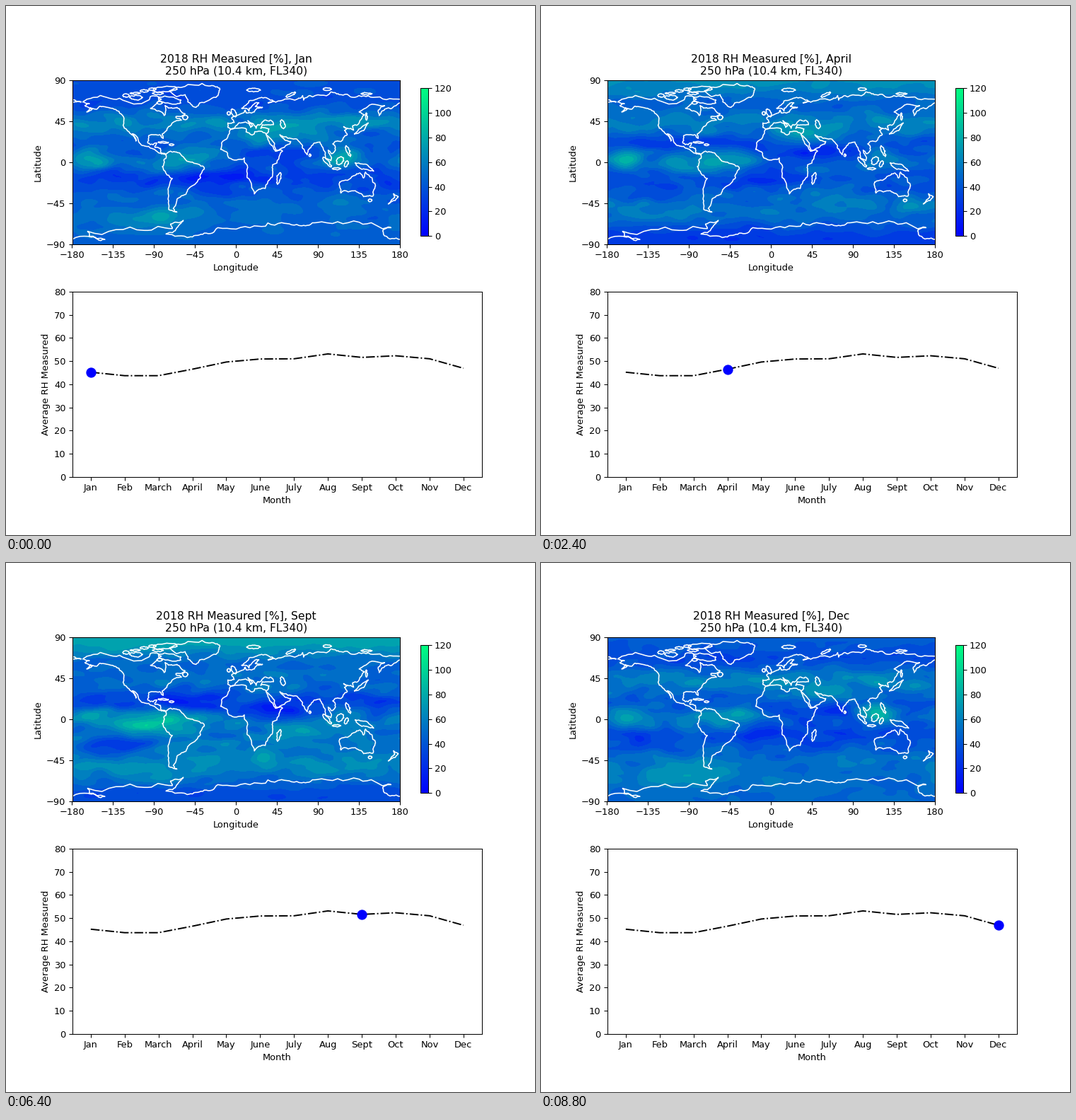
A matplotlib script that plays this animation: 748x748 px, repeating every 9.6 s.

```python
import numpy as np
import matplotlib.pyplot as plt
from matplotlib.animation import FuncAnimation
from matplotlib.cm import ScalarMappable
from matplotlib.colors import Normalize

plt.rcParams["font.family"] = "DejaVu Sans"

MONTHS = ["Jan", "Feb", "March", "April", "May", "June",
          "July", "Aug", "Sept", "Oct", "Nov", "Dec"]
AVERAGE = [45.2, 43.7, 43.7, 46.5, 49.6, 50.9, 51.0, 53.1, 51.6, 52.3, 51.0, 46.9]
LON = np.arange(-180, 180, 0.625)
LAT = np.arange(-90, 90.1, 1.25)
LEVELS = np.arange(0, 121, 8)
GLOBE = np.inf

# lon, lat, width, height, mean strength, seasonal swing, month of the peak
FEATURES = [
    (0, 88, GLOBE, 13, 18, 26, 6),         # polar summer, north
    (0, 62, GLOBE, 10, -6, 7, 6),
    (0, 45, GLOBE, 9, 10, 8, 0.5),         # storm track
    (0, 18, GLOBE, 9, -14, 8, 0),          # subtropical dry belt
    (0, -18, GLOBE, 12, -4, 11, 7),
    (0, -52, GLOBE, 14, 10, 9, 6.5),
    (0, -84, GLOBE, 13, -14, 15, 11),      # polar summer, south
    (-160, 4, 15, 8, 34, 6, 2),            # Pacific warm pool
    (-100, -3, 25, 9, 18, 20, 7),          # eastern Pacific
    (-55, 1, 32, 9, 28, 6, 2),             # Amazon and Atlantic
    (75, -9, 28, 6, 12, 17, 6),            # Indian Ocean
    (116, 6, 14, 10, 26, 10, 0),           # Indonesia
    (42, 28, 28, 8, 20, 9, 1),             # Middle East
    (48, 8, 34, 7, -16, 2, 6),             # Arabian Sea
    (-135, -30, 28, 8, -18, -16, 7),       # South Pacific dry zone
    (-55, 23, 38, 8, -8, -8, 7),           # North Atlantic dry zone
    (-15, -15, 38, 7, -10, -10, 0),        # South Atlantic dry zone
    (-95, -61, 38, 9, 8, 15, 11.5),        # Southern Ocean
]

fig = plt.figure(figsize=(8, 8), dpi=93.5)
map_ax, line_ax = fig.subplots(2, 1)


def bell(offset, width):
    return np.exp(-(offset / width) ** 2 / 2)


def texture(seed):
    """Smooth unit-variance noise, stretched along the parallels."""
    white = np.random.default_rng(seed).normal(size=(LAT.size, LON.size))
    fy = np.fft.fftfreq(LAT.size, 1.25)[:, None]
    fx = np.fft.fftfreq(LON.size, 0.625)
    lowpass = np.exp(-2 * np.pi ** 2 * ((8 * fx) ** 2 + (3.2 * fy) ** 2))
    smooth = np.fft.ifft2(np.fft.fft2(white) * lowpass).real
    return smooth / smooth.std()


def humidity(month):
    """Seasonal features and noise, shifted to the month's average."""
    field = 5 * np.cos(np.radians(LAT))[:, None] ** 0.5 * texture(month + 1)
    for lon, lat, width, height, mean, swing, peak in FEATURES:
        strength = mean + swing * np.cos(2 * np.pi * (month - peak) / 12)
        around = (LON - lon + 180) % 360 - 180
        field += strength * np.outer(bell(LAT - lat, height), bell(around, width))
    return np.clip(field - field.mean() + AVERAGE[month], 2, 118)


# ---- coastlines: key points joined by ragged lines ---------------------

rng = np.random.default_rng(4)


def coast(*points, passes=3):
    line = np.array(points, float)
    for _ in range(passes):
        step = np.diff(line, axis=0)
        across = step[:, ::-1] * (1, -1)
        finer = np.empty((2 * len(line) - 1, 2))
        finer[::2] = line
        finer[1::2] = line[:-1] + step / 2 + across * rng.normal(0, 0.1, (len(step), 1))
        line = finer
    map_ax.plot(*line.T, color="white", lw=1.2)


def island(lon, lat, width, height, lean=0):
    """Ragged ellipse; lean shifts the northern end eastwards."""
    angle = np.linspace(0, 2 * np.pi, 9)
    x, y = np.cos(angle) * width / 2, np.sin(angle) * height / 2
    coast(*zip(lon + x + lean * y, lat + y), passes=2)


# North America
coast((-168, 66), (-156, 71), (-128, 70), (-96, 68), (-94, 72), (-82, 69),
      (-87, 65), (-94, 59), (-82, 55), (-79, 51), (-77, 57), (-78, 62),
      (-70, 59), (-65, 60), (-56, 53), (-66, 50), (-65, 48), (-60, 46),
      (-70, 43), (-76, 36), (-81, 31), (-80, 26), (-84, 30), (-96, 29),
      (-97, 21), (-91, 19), (-87, 21), (-89, 16), (-83, 15), (-82, 9), (-77, 8))
coast((-77, 8), (-85, 10), (-95, 16), (-105, 20), (-114, 31), (-110, 23),
      (-117, 32), (-124, 40), (-123, 48), (-134, 58), (-147, 61), (-153, 58),
      (-164, 55), (-158, 58), (-166, 62), (-161, 64), (-168, 66))
# South America
coast((-77, 8), (-72, 12), (-62, 10), (-50, 0), (-35, -6), (-39, -17),
      (-48, -26), (-57, -36), (-65, -41), (-69, -51), (-65, -55), (-74, -52),
      (-74, -37), (-70, -18), (-76, -14), (-81, -5), (-77, 4), (-77, 8))
# Greenland
coast((-73, 78), (-60, 82), (-30, 83.5), (-18, 81), (-22, 71), (-40, 65),
      (-44, 60), (-53, 66), (-56, 74), (-73, 78))
# Northern Europe and Siberia
coast((-6, 36), (-9, 38), (-9, 43), (-2, 43.5), (-5, 48.5), (8, 54), (10, 57),
      (11, 54), (20, 55), (23, 59), (29, 60), (21, 61), (25, 65), (17, 61),
      (14, 56), (11, 59), (6, 59), (14, 67), (28, 71), (41, 67), (35, 65),
      (46, 67), (67, 69), (73, 73), (74, 68), (81, 73), (104, 77), (113, 74),
      (130, 71), (150, 71), (180, 69))
coast((-180, 69), (-170, 66), (-180, 65))
# Pacific Asia to Arabia
coast((180, 65), (172, 60), (163, 58), (157, 51), (156, 57), (163, 62),
      (142, 59), (135, 55), (141, 52), (135, 43), (128, 40), (129, 35),
      (126, 37), (118, 39), (122, 37), (119, 35), (122, 30), (115, 22.5),
      (106, 20), (109, 13), (105, 9), (101, 13), (104, 1.5), (98, 10), (92, 22),
      (87, 21), (80, 14), (78, 8), (73, 18), (67, 25), (57, 26), (48, 30),
      (54, 24), (60, 22.5), (44, 13), (33, 30))
# Africa
coast((33, 30), (37, 20), (43, 12), (51, 12), (40, -3), (40, -15), (35, -21),
      (32, -29), (20, -35), (12, -17), (9, 0), (9, 4.5), (-8, 4.5), (-17, 14),
      (-16, 21), (-6, 36), (10, 37), (11, 33), (20, 31), (33, 31))
# Northern Mediterranean and the Black Sea
coast((33, 31), (36, 36.5), (27, 37), (29, 41), (41, 41), (38, 46), (31, 46),
      (28, 42), (23, 40), (22, 37), (19, 42), (13, 45.5), (18, 40), (16, 38),
      (10, 44), (3, 43), (-2, 37), (-6, 36))
# Australia and New Guinea
coast((114, -22), (129, -15), (136, -12), (140, -17.5), (142, -11), (153, -26),
      (150, -37.5), (140, -38), (131, -31.5), (115, -34), (114, -22))
coast((131, -1), (145, -4), (151, -10), (138, -8), (131, -1))
# Japan and New Zealand
coast((130, 31), (140, 40), (145, 43), (141, 36), (130, 31))
coast((173, -35), (178, -38), (167, -46), (174, -39), (173, -35))
# Antarctica
coast((-180, -85), (-144, -85), (-161, -82), (-163, -76), (-101, -75),
      (-70, -73), (-72, -68), (-58, -64), (-65, -72), (-77, -79), (-50, -82),
      (-35, -78), (-20, -72), (20, -70), (50, -66.5), (72, -70), (88, -66.5),
      (135, -66), (170, -72), (161, -75), (163, -81), (180, -85))

for place in [(-73, 68, 24, 9, -1.2), (-78, 80, 26, 6, 1.5), (-110, 71, 14, 5),
              (-121, 73, 7, 4), (-86, 75.5, 12, 2), (-111, 75.5, 11, 2),
              (-101, 78, 9, 3), (-92, 80, 8, 3), (-84, 65, 6, 3), (-56, 49, 6, 5),
              (-80, 21.5, 11, 2, -2), (-71, 19, 5, 2), (-2.5, 54, 5, 9, -0.4),
              (-8, 53.5, 4, 4), (19, 79, 15, 4), (60, 74, 6, 6, 1.5),
              (100, 80, 9, 3), (143, 75, 12, 2), (51, 41.5, 5, 10, -0.2),
              (47, -18, 4, 13, 0.25), (81, 7.5, 2, 3), (143, 50, 2, 8),
              (123, 12, 4, 12, -0.4), (100, 0, 5, 11, -0.8), (110, -7.3, 9, 2),
              (114, 1.5, 8, 9, 0.3), (121, -2, 4, 7, 0.3), (147, -42, 4, 3)]:
    island(*place)

# ---- axes --------------------------------------------------------------

map_ax.set(xlim=(-180, 180), ylim=(-90, 90), aspect="equal",
           xticks=np.arange(-180, 181, 45), yticks=np.arange(-90, 91, 45),
           xlabel="Longitude", ylabel="Latitude")
fig.colorbar(ScalarMappable(Normalize(0, 120), "winter"), ax=map_ax, shrink=0.8)

line_ax.plot(MONTHS, AVERAGE, "k-.")
marker, = line_ax.plot([0], AVERAGE[:1], "bo", markersize=10)
line_ax.set(ylim=(0, 80), xlabel="Month", ylabel="Average RH Measured")


def update(month):
    for old in list(map_ax.collections):
        old.remove()
    map_ax.contourf(LON, LAT, humidity(month), LEVELS,
                    cmap="winter", vmin=0, vmax=120)
    map_ax.set(xlim=(-180, 180), ylim=(-90, 90))
    map_ax.set_title(f"2018 RH Measured [%], {MONTHS[month]}\n"
                     "250 hPa (10.4 km, FL340)")
    marker.set_data([month], [AVERAGE[month]])


animation = FuncAnimation(fig, update, frames=12, interval=800, repeat=True)
plt.show()
```
